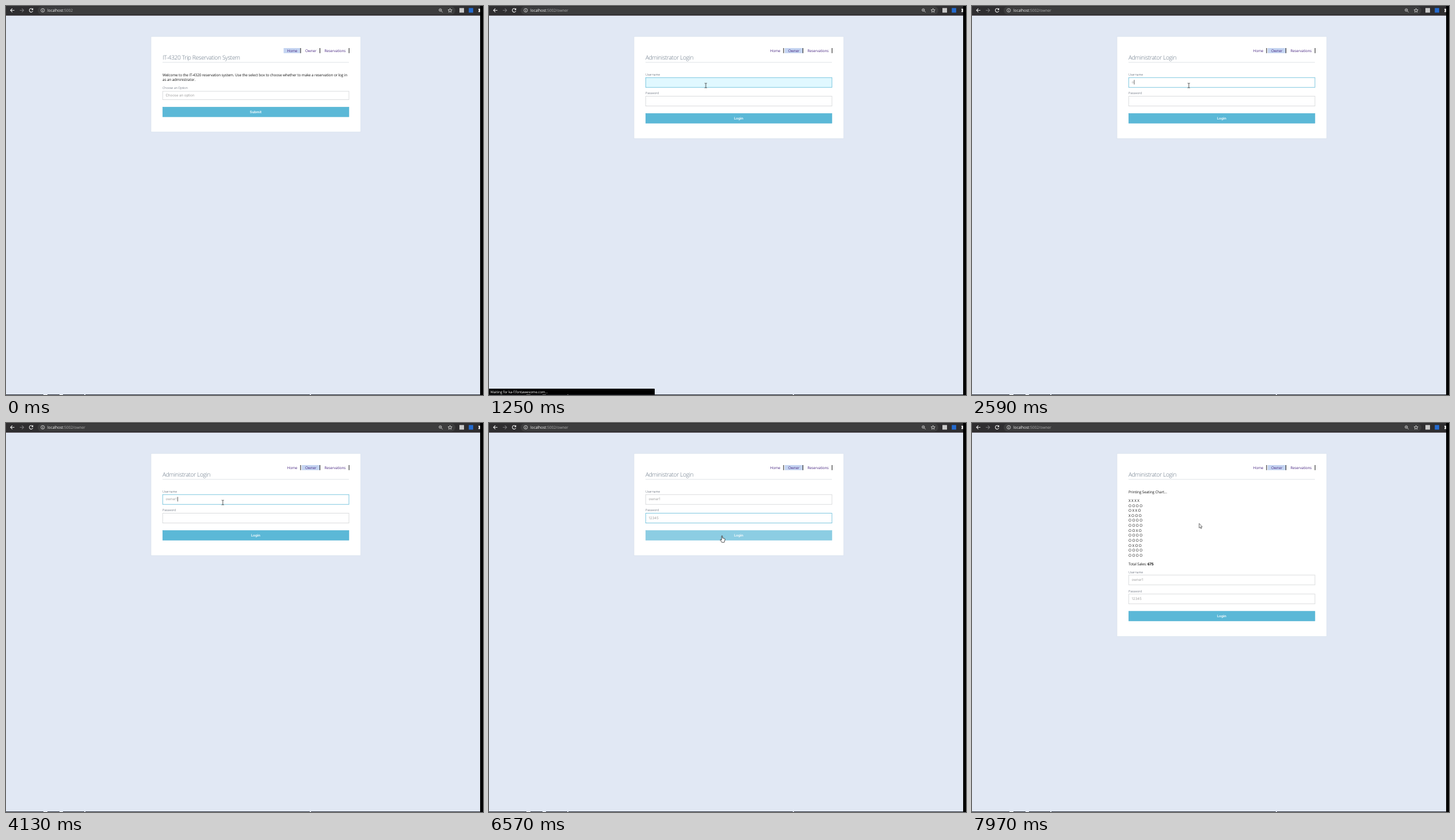
An HTML page for the animation above (8 s loop, 829 by 675 pixels).

```html
<!DOCTYPE html>
<html lang="en">
<head>
<meta charset="utf-8">
<title>Trip Reservation System</title>
<style>
html, body { margin: 0; width: 100%; height: 100%; overflow: hidden; background: #e1e8f4; }
svg { display: block; width: 829px; height: 675px; }
text { font: 6.4px "Open Sans", "Noto Sans", sans-serif; letter-spacing: -.02em; fill: #151515; white-space: pre; text-rendering: geometricPrecision; }
.title { font-size: 10.2px; font-weight: 300; letter-spacing: -.035em; fill: #607080; }
.label { font-size: 5.6px; font-weight: 300; fill: #3c4657; }
.value { font: 300 6.1px Inter, sans-serif; letter-spacing: 0; fill: #858585; }
.button { font: 600 6px Inter, sans-serif; letter-spacing: 0; fill: #fff; text-anchor: middle; }
.nav text { fill: #4b2a83; }
.url { font-size: 6.8px; fill: #f1f1f1; }
.dim { fill: #aaa; }
.status { font-size: 6.2px; fill: #fff; }
.card { fill: #fff; stroke: #d6e0ec; stroke-width: .7; }
.field { fill: #fff; stroke: #d2d4d6; stroke-width: .8; }
.fill { fill: #5bb8d7; stroke: #4db0d0; stroke-width: .6; }
.icon { fill: none; stroke: #e8e8e8; stroke-width: 1.1; }

#pointer { animation: move 8s infinite; }
@keyframes move {
  0%, .25% { transform: translate(823px, 150px); animation-timing-function: cubic-bezier(.3, .1, .3, 1); }
  7%, 11.25% { transform: translate(530px, 77px); animation-timing-function: ease-in-out; }
  15%, 72.5% { transform: translate(376.7px, 138px); animation-timing-function: ease-in-out; }
  79.5%, 92.9% { transform: translate(405px, 196px); animation-timing-function: ease-in-out; }
  98.75%, 100% { transform: translate(394.7px, 174.2px); }
}
#user { animation: user 8s linear infinite; }
@keyframes user {
  0%, 13.8% { fill: #fff; stroke: #d2d4d6; }
  15.5%, 18% { fill: #e0f8ff; stroke: #5fbad8; }
  20.5%, 55% { fill: #fff; stroke: #5fbad8; }
  62%, 73% { fill: #d8f5fd; stroke: #5fbad8; }
  79%, 100% { fill: #fff; stroke: #d2d4d6; }
}
#pass { animation: pass 8s linear infinite; }
@keyframes pass {
  0%, 55% { stroke: #d2d4d6; }
  59%, 100% { stroke: #5fbad8; }
}
#hover { animation: hover 8s linear infinite; }
@keyframes hover {
  0%, 78% { opacity: 1; }
  81.5%, 100% { opacity: .7; }
}
</style>
</head>
<body>
<svg viewBox="0 0 829 675">
  <rect width="829" height="675" fill="#e1e8f4"/>

  <g id="toolbar">
    <rect width="824" height="16.5" fill="#2f2e30"/>
    <rect x="55" y="1" width="726" height="13.5" rx="6.7" fill="#3d3d3e"/>
    <rect y="16" width="824" height=".8" fill="#655d64"/>
    <path class="icon" d="M14.6 7.5H8M11 4.3 7.8 7.5l3.2 3.2"/>
    <path class="icon" style="stroke:#77777a" d="M24 7.5h6.6M27.6 4.3l3.2 3.2-3.2 3.2"/>
    <g data-show="0 6610 7200 8000">
      <path class="icon" d="M46.2 5.4A3.2 3.2 0 1 0 46.7 8.6"/>
      <path d="M47.2 3.6v3.3h-3.4z" fill="#e8e8e8"/>
    </g>
    <path class="icon" data-show="6610 7200" d="M40.6 4.6l5.8 5.8M46.4 4.6l-5.8 5.8"/>
    <circle class="icon" cx="63.8" cy="7.5" r="3.1" style="stroke-width:.8"/>
    <path class="icon" style="stroke-width:.9" d="M63.8 5.5v.9M63.8 7v2.4"/>
    <text class="url" x="72" y="9.9">localhost<tspan class="dim">:5002</tspan></text>
    <text class="url dim" data-show="840 8000" id="path" y="9.9">/owner</text>
    <g class="icon" style="stroke-width:.8">
      <circle cx="754.8" cy="7" r="2.2"/><path d="M756.5 8.7l2.3 2.4M753.8 7h2"/>
      <path d="M771.7 4.2l1 2.3 2.5.2-1.9 1.6.6 2.5-2.2-1.3-2.2 1.3.6-2.5-1.9-1.6 2.5-.2z"/>
    </g>
    <rect x="788" y="3.5" width="8" height="8" fill="#c9c9c9"/>
    <rect x="804.3" y="3.5" width="7.6" height="8" fill="#246bd0"/>
    <path d="M821 4.8h3v5.6h-3V8.5h.8V6.7H821z" fill="#e8e8e8"/>
  </g>

  <g data-show="0 840">
    <rect class="card" x="252" y="53" width="364.5" height="165.7"/>
    <rect x="482.5" y="73" width="29" height="8.8" fill="#c4d4f1"/>
    <text class="title" x="272" y="93.3">IT-4320 Trip Reservation System</text>
    <text x="272" y="121.8">Welcome to the IT-4320 reservation system. Use the select box to choose whether to make a reservation or log in</text>
    <text x="272" y="130.3">as an administrator.</text>
    <text class="label" x="272" y="144.4">Choose an Option</text>
    <rect class="field" x="272.3" y="148" width="323.7" height="14.4"/>
    <text class="value" x="277.5" y="157.4">Choose an option</text>
    <rect class="fill" x="272.3" y="175.4" width="323.7" height="16.8"/>
    <text class="button" x="434" y="185.8">Submit</text>
  </g>

  <g data-show="840 8000">
    <rect class="card" data-show="840 6640" x="252" y="53" width="364.5" height="177"/>
    <rect class="card" data-show="6640 8000" x="252" y="53" width="364.5" height="317.3"/>
    <rect x="514" y="73" width="31.5" height="8.8" fill="#c4d4f1"/>
    <text class="title" x="272" y="93.3">Administrator Login</text>
  </g>

  <g data-show="840 6640">
    <rect class="field" id="user" x="272.3" y="124.2" width="323.7" height="17"/>
    <rect class="field" id="pass" x="272.3" y="156.6" width="323.7" height="17"/>
    <g id="typing"></g>
    <g id="hover">
      <rect class="fill" x="272.3" y="186.5" width="323.7" height="16.8"/>
      <text class="button" x="434" y="197">Login</text>
    </g>
    <text class="label" x="272" y="120.6">Username</text>
    <text class="label" x="272" y="153.4">Password</text>
  </g>

  <g data-show="6640 8000">
    <text x="272" y="121.8">Printing Seating Chart...</text>
    <g id="seats"></g>
    <text x="272" y="246.9">Total Sales: <tspan font-weight="700" style="font-weight:700">675</tspan></text>
    <g transform="translate(0 140.2)">
      <text class="label" x="272" y="120.6">Username</text>
      <text class="label" x="272" y="153.4">Password</text>
      <rect class="field" x="272.3" y="123.7" width="323.7" height="17"/>
      <rect class="field" x="272.3" y="156.6" width="323.7" height="17"/>
      <text class="value" x="277.5" y="134.2">owner1</text>
      <text class="value" x="277.5" y="167">12345</text>
      <rect class="fill" x="272.3" y="186.5" width="323.7" height="16.8"/>
      <text class="button" x="434" y="197">Login</text>
    </g>
  </g>

  <g class="nav">
    <path d="M272 97.8h324" stroke="#d8dce0" stroke-width=".8"/>
    <path d="M512 73v8.8M545.6 73v8.8M596.2 73v8.8" stroke="#111"/>
    <text x="488.6" y="80">Home</text>
    <text x="520" y="80">Owner</text>
    <text x="553.5" y="80">Reservations</text>
  </g>

  <path d="M0 674.5h824" stroke="#2a2f3c"/>
  <path d="M65 674.5h7M93 674.5h6M136 674.5h2M528 674.5h2" stroke="#eef2f8"/>
  <g data-show="600 1600">
    <path d="M0 664h287q1 0 1 1v9.6H0z" fill="#000"/>
    <text class="status" data-show="600 860" x="2.3" y="671.6">localhost:5002/owner</text>
    <text class="status" data-show="860 1600" x="2.3" y="671.6">Waiting for ka-f.fontawesome.com...</text>
  </g>
  <rect x="824" width="5" height="675"/>

  <g id="pointer">
    <path data-show="20 560 930 1130 5950 6020 6130 6240 7430 8000" d="M0 0v8l1.8-1.6 1.3 2.7 1.2-.6L3.1 6h2.3z" fill="#fff" stroke="#222" stroke-width=".7"/>
    <path data-show="1130 5950 6020 6130" d="M-2-4h1.5l.5.5.5-.5H2M0-3.5v7M-2 4h1.5l.5-.5.5.5H2" fill="none" stroke="#222" stroke-width=".8"/>
    <path data-show="560 930 6240 7430" d="M-.8 0q.8-.9 1.6 0v3.6l3.6.9q.9.3.8 1.3l-.7 3.3-.7 2H-.4L-3 7.2q-.3-1 .8-1l1.4 1z" fill="#fff" stroke="#222" stroke-width=".8"/>
  </g>
</svg>

<script>
const LOOP = 8000;
const $ = id => document.getElementById(id);

function add(parent, tag, attrs, text = "") {
  const el = document.createElementNS("http://www.w3.org/2000/svg", tag);
  for (const key in attrs) el.setAttribute(key, attrs[key]);
  el.textContent = text;
  parent.append(el);
  return el;
}

"XXXX OOOO OXXO XOOO OOOO OOOO OOXO OOOO OOOO OXOO OOOO OOOO".split(" ").forEach((row, i) =>
  add($("seats"), "text", { x: 272, y: 136.9 + i * 8.64 }, [...row].join(" ")));

// One text per typed prefix; the caret stays lit for half a blink after a key.
function typeInto(y, word, focus, keys, blur) {
  const times = [focus, ...keys, LOOP];
  for (let i = 0; i <= word.length; i++) {
    const from = times[i], to = times[i + 1];
    const text = add($("typing"), "text",
      { class: "value", x: 277.5, y, "data-show": `${from} ${to}` }, word.slice(0, i));
    const end = Math.min(to, blur), blinks = [];
    for (let t = from; t < end; t += 1060) blinks.push(t, Math.min(t + 530, end));
    add($("typing"), "rect", {
      x: 278 + text.getComputedTextLength(), y: y - 6.2, width: .7, height: 8,
      fill: "#222", "data-show": blinks.join(" ")
    });
  }
}
typeInto(134.4, "owner1", 1500, [2530, 2780, 3050, 3330, 3600, 3900], 4400);
typeInto(166.8, "12345", 4400, [4960, 5200, 5380, 5540, 5700], 6640);

$("path").setAttribute("x", 72 + document.querySelector(".url").getComputedTextLength());

// data-show lists on/off times in ms; each element gets its own stepped keyframes.
let rules = "";
document.querySelectorAll("[data-show]").forEach((el, i) => {
  const times = el.dataset.show.split(" ").map(Number);
  const steps = times[0] ? ["0% { opacity: 0 }"] : [];
  times.forEach((t, n) => {
    if (t < LOOP) steps.push(`${t / LOOP * 100}% { opacity: ${1 - n % 2} }`);
  });
  steps.push(`100% { opacity: ${times.at(-1) === LOOP ? 1 : 0} }`);
  rules += `@keyframes show${i} { ${steps.join(" ")} }\n`;
  el.style.animation = `show${i} ${LOOP}ms step-end infinite`;
});
document.head.append(Object.assign(document.createElement("style"), { textContent: rules }));
</script>
</body>
</html>
```
